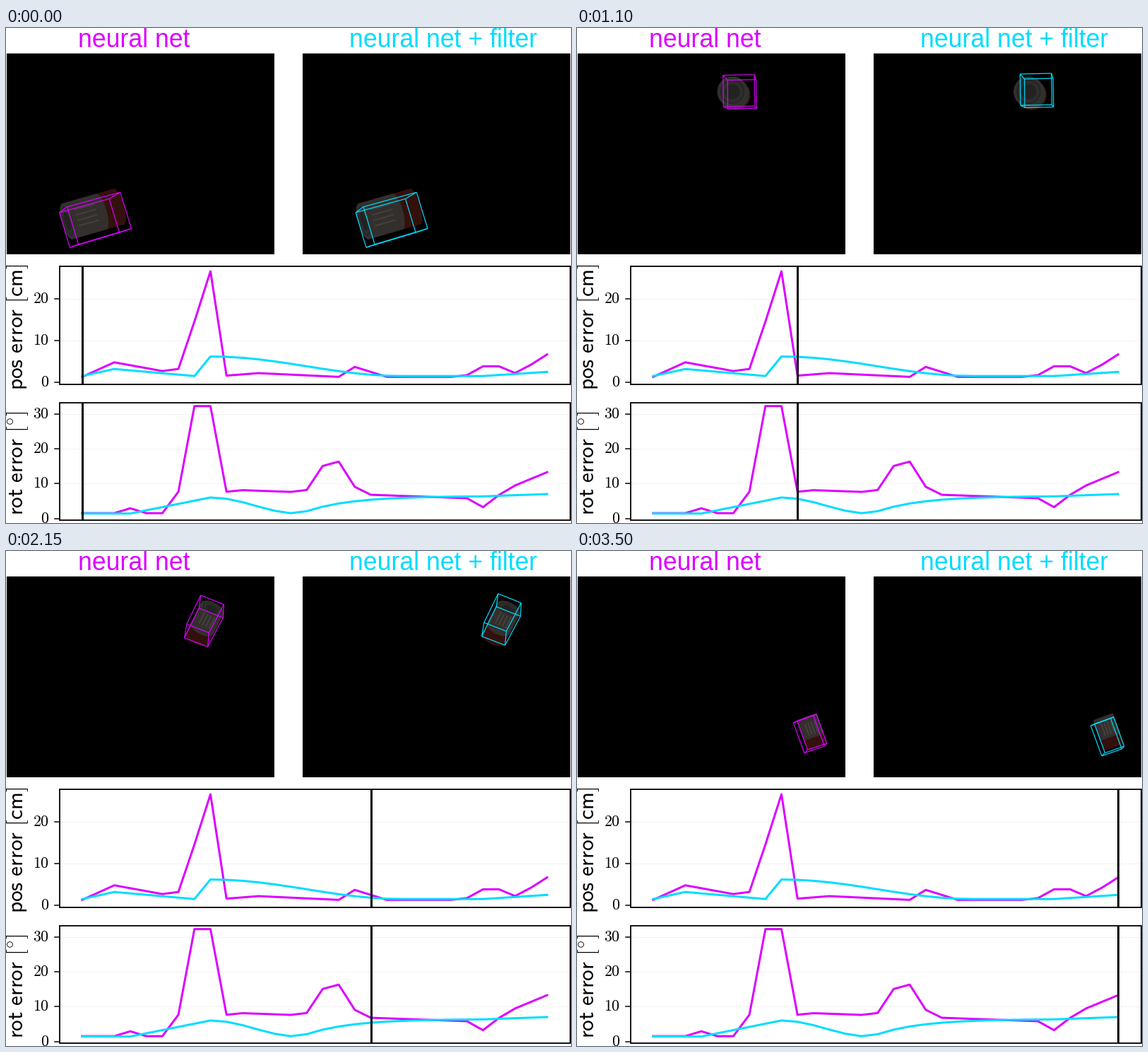
These frames come from a looping animation (800 px wide and 700 px high, 3.6 s). A matplotlib script:

```python
from itertools import combinations, product

import numpy as np
import matplotlib.pyplot as plt
from matplotlib.animation import FuncAnimation
from matplotlib.collections import LineCollection
from matplotlib.patches import Polygon, Rectangle

plt.rcParams["mathtext.fontset"] = "cm"

W, H, DPI = 800, 700, 100
PX = 72 / DPI  # points per pixel
STEPS = np.arange(30)
STARTS = np.round(2.4 * STEPS)  # ticks of 50 ms
STEP_X = 107.4 + 22.7 * STEPS
NET, FILTER = "#dc00ff", "#00dcff"
SHIFT = np.array([419.5, 0])  # between the two camera images
FOCAL = 700


def hat(peak, height, rise, fall, ease=False):
    """Triangular bump, with an optional soft fall."""
    t = np.minimum(1 - (peak - STEPS) / rise, 1 - (STEPS - peak) / fall)
    t = np.clip(t, 0, 1)
    if ease:
        t = np.where(STEPS > peak, (1 - np.cos(np.pi * t)) / 2, t)
    return height * t


POS_NET = (1.3 + hat(2, 3.5, 2, 5) + hat(8, 25.4, 2.1, 1) + hat(11, .9, 3, 5)
           + hat(17, 2.4, 1, 2) + hat(25.5, 3.6, 1.7, 1.7)
           + hat(29, 5.4, 2.2, 1))
POS_FILTER = (1.5 + hat(2, 1.7, 2, 5) + hat(8, 4.7, 1, 12, ease=True)
              + hat(29, 1, 4, 1))
ROT_NET = (1.5 + hat(3, 1.4, 1, 1) + hat(7.5, 43, 1.75, 1.75)
           + hat(10, 6.6, 1, 40) + hat(15.6, 12, 1.7, 1.7)
           - hat(25, 2.4, 1, 1.5) + hat(29, 8.3, 4, 1))
ROT_FILTER = (1.4 + hat(8, 4.6, 5, 5.5, ease=True) + hat(29, .6, 4, 1)
              + 5 * (1 - np.exp(-np.clip(STEPS - 13.6, 0, None) / 2.8)))

# Key poses: step, centre x and y, then heading, tilt and spin in degrees
KEYS, *TRACKS = np.array([
    [0, 125, 271.5, -16, 17, -3],
    [4, 180.4, 161.6, -23, 46, 53],
    [9, 231, 90.7, 50, 84, -51],
    [13, 258.3, 73.2, 119, 68, -163],
    [18, 280.2, 98.6, 117, 31, -191],
    [24, 304, 170.7, 96, 16, -154],
    [29, 330, 257.2, 70, 3, -170],
]).T
POSES = np.array(TRACKS).T
SLOPES = np.gradient(POSES, KEYS, axis=0, edge_order=2)


def pose_at(k):
    """Cubic Hermite curve through the key poses."""
    i = min(np.searchsorted(KEYS, k, "right") - 1, len(KEYS) - 2)
    h = KEYS[i + 1] - KEYS[i]
    s = (k - KEYS[i]) / h
    return ((1 + 2 * s) * (1 - s) ** 2 * POSES[i]
            + s * (1 - s) ** 2 * h * SLOPES[i]
            + s * s * (3 - 2 * s) * POSES[i + 1]
            + s * s * (s - 1) * h * SLOPES[i + 1])


def box_axes(k, heading, tilt, spin):
    """Long axis and two side axes in pixels, z pointing away."""
    size = 2000 / (38 + k)  # steady motion away from the camera
    (ch, ct, cs), (sh, st, ss) = (f(np.radians([heading, tilt, spin]))
                                  for f in (np.cos, np.sin))
    u = np.array([ct * ch, ct * sh, st])
    p = np.array([-sh, ch, 0])
    q = np.array([-st * ch, -st * sh, ct])
    return size * np.array([1.5 * u, cs * p + ss * q, ss * p - cs * q])


CORNERS = np.array(list(product((-.5, .5), repeat=3)))
EDGES = [(i, j) for i, j in combinations(range(8), 2)
         if np.sum(CORNERS[i] != CORNERS[j]) == 1]


def box_edges(centre, axes, scale=1, turn=0):
    co, si = scale * np.cos(turn), scale * np.sin(turn)
    pts = CORNERS @ axes
    flat = pts[:, :2] / (1 + pts[:, 2:] / FOCAL)
    flat = centre + flat @ np.array([[co, si], [-si, co]])
    return [(flat[i], flat[j]) for i, j in EDGES]


def ring(v, w, angle):
    return (np.outer(np.cos(angle), v) + np.outer(np.sin(angle), w)) / 2


def sleeve(c, u, v, w, a, b):
    """Outline of the cylinder between fractions a and b of its axis."""
    n = np.array([-u[1], u[0]])
    q = np.arctan2(w @ n, v @ n)
    if (np.cos(q) * w - np.sin(q) * v) @ u < 0:
        w, q = -w, -q
    arc = np.linspace(q, q + np.pi, 30)
    return np.vstack([c + (b - .5) * u + ring(v, w, arc),
                      c + (a - .5) * u + ring(v, w, arc + np.pi)])


def print_lines(c, u, v, w):
    n = np.array([-u[1], u[0]]) / np.hypot(*u)
    half = np.hypot(v @ n, w @ n) / 2
    return [(c - .32 * u + f * half * n, c + .08 * u + f * half * n)
            for f in (-.5, -.2, .1, .4)]


fig = plt.figure(figsize=(W / DPI, H / DPI), dpi=DPI, facecolor="white")
ax = fig.add_axes([0, 0, 1, 1])
ax.set_xlim(-.5, W - .5)  # whole numbers are pixel centres
ax.set_ylim(H - .5, -.5)
ax.axis("off")


def plot_panel(top, bottom, zero, unit, ticks, label, label_y, net, filt):
    for t in ticks:
        y = zero - unit * t
        ax.plot([75, 799], [y, y], color="#f2f2f2", lw=1 * PX, zorder=1)
        ax.plot([68, 75], [y, y], color="black", lw=1.5 * PX, zorder=3)
        ax.text(60.5, y, f"${t}$", size=22 * PX, ha="right", va="center")
    for data, color in ((net, NET), (filt, FILTER)):
        ax.plot(STEP_X, zero - unit * data, color=color, lw=3 * PX, zorder=2)
    ax.add_patch(Rectangle((75, top), 723.5, bottom - top, fill=False,
                           ec="black", lw=1.8 * PX, zorder=4))
    ax.text(16.5, label_y, label, size=31.3 * PX, rotation=90,
            ha="center", va="center")
    cursor, = ax.plot([], [], color="black", lw=3 * PX, zorder=5,
                      solid_capstyle="butt")
    return cursor, (top, bottom)


cursors = [
    plot_panel(336, 503, 500.5, 5.88, (0, 10, 20),
               r"$\mathsf{pos\ error\ [cm]}$", 422.5, POS_NET, POS_FILTER),
    plot_panel(529, 695.5, 693, 4.93, (0, 10, 20, 30),
               r"$\mathsf{rot\ error\ [}^{\circ}\mathsf{]}$", 614.5,
               ROT_NET, ROT_FILTER),
]


class View:
    """One camera image with the can and an estimated box."""

    def __init__(self, x, title, title_x, color, shift):
        self.shift = shift
        ax.add_patch(Rectangle((x, 35.5), 379, 284, fc="black", lw=0))
        ax.text(title_x, 26.5, title, color=color, size=35.6 * PX,
                family="Liberation Sans", ha="center", va="baseline")
        self.band = self.shape("#34100c", 2)
        self.body = self.shape("#322f2c", 3)
        self.lines = LineCollection([], colors="#44403c", lw=2 * PX, zorder=4)
        self.caps = [self.shape(c, 5) for c in
                     ("#30302e", "#20201f", "#2d2d2b", "#222221")]
        self.box = LineCollection([], colors=color, lw=1.2 * PX, zorder=6)
        ax.add_collection(self.lines)
        ax.add_collection(self.box)

    @staticmethod
    def shape(color, z):
        return ax.add_patch(Polygon([[0, 0], [0, 0], [0, 0]], fc=color,
                                    lw=0, zorder=z))

    def draw(self, c, axes, edges):
        c = c + self.shift
        u, v, w = axes[:, :2]
        self.band.set_xy(sleeve(c, u, v, w, 0, 1))
        self.body.set_xy(sleeve(c, u, v, w, 0, .66))
        self.lines.set_segments(print_lines(c, u, v, w))
        angle = np.linspace(0, 2 * np.pi, 60)
        for cap, r in zip(self.caps, (1, .8, .74, .5)):
            cap.set_xy(c - u / 2 + r * ring(v, w, angle))
        self.box.set_segments(edges)


net_view = View(.5, "neural net", 180.5, NET, 0 * SHIFT)
filter_view = View(419.5, "neural net + filter", 619, FILTER, SHIFT)


def update(tick):
    k = int(np.searchsorted(STARTS, tick, "right")) - 1
    pose = pose_at(k)
    centre, axes = pose[:2], box_axes(k, *pose[2:])

    # Slowly swinging errors of the estimates
    drift = np.array([2 + 7.5 * np.cos((k - 8) / 5.2),
                      9 * np.cos(k / 5) * np.exp(-k / 20)])
    lag = min(k / 13, 1) * np.array([1.5, -5 * np.sin(k / 4.2 - 1.6)])
    scale, turn = 1, 0
    if POS_NET[k] > 10:  # the net loses the can for a moment
        scale, turn = 1 / (1 + POS_NET[k] / 54), np.radians(ROT_NET[k])

    net_view.draw(centre - drift, axes, box_edges(centre, axes, scale, turn))
    filter_view.draw(centre - drift, axes,
                     box_edges(centre + SHIFT + lag, axes))
    for line, ys in cursors:
        line.set_data([STEP_X[k]] * 2, ys)
    return []


anim = FuncAnimation(fig, update, frames=72, interval=50, repeat=True,
                     repeat_delay=0, init_func=lambda: update(0))
plt.show()
```
